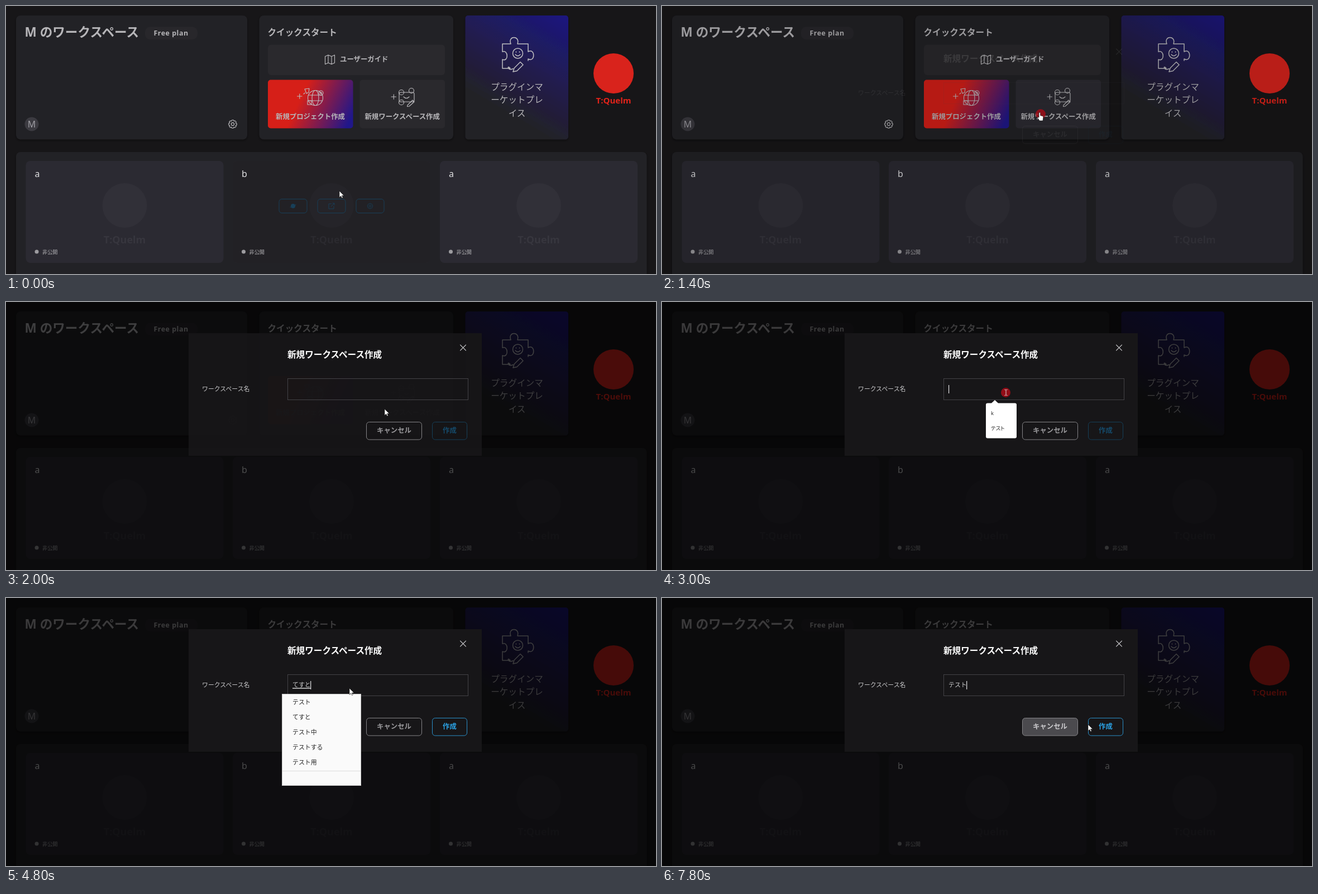
These frames come from a looping animation (1164 by 481 pixels, 8000 ms). An HTML page:

```html
<!DOCTYPE html>
<html lang="ja">
<head>
<meta charset="utf-8">
<title>ワークスペース作成</title>
<style>
html, body { margin: 0; width: 100%; height: 100%; overflow: hidden; background: #171618; }
svg { display: block; width: 100%; height: 100%; }
text { font-family: 'Noto Sans', 'Noto Sans CJK JP', 'Noto Sans CJK', sans-serif; fill: #b7b6b9; }
.b { font-weight: 700; }
.mid { text-anchor: middle; }
.h { font-size: 15.6px; }
.btn { font-size: 12.4px; font-weight: 700; }
.small { font-size: 10.9px; }
.panel { fill: #222125; }
.tile { fill: #2a292d; }
.line { fill: none; stroke: #bfbec1; stroke-width: 1.1; stroke-linejoin: round; stroke-linecap: round; }
.blue { fill: none; stroke: #183f58; }
</style>
</head>
<body>
<svg viewBox="0 0 1164 481" preserveAspectRatio="none">
  <defs>
    <linearGradient id="hot" gradientUnits="userSpaceOnUse" x1="469" y1="140" x2="621" y2="210">
      <stop offset=".38" stop-color="#d61f18"/><stop offset=".96" stop-color="#20178a"/>
    </linearGradient>
    <linearGradient id="cool" gradientUnits="userSpaceOnUse" x1="880" y1="188" x2="988" y2="5">
      <stop offset="0" stop-color="#222125"/><stop offset="1" stop-color="#1e1780"/>
    </linearGradient>
    <filter id="soft" x="-10%" y="-10%" width="120%" height="125%">
      <feDropShadow dx="0" dy="2" stdDeviation="2" flood-color="#000" flood-opacity=".4"/>
    </filter>
    <path id="gear" d="M-1.6 -7.2H1.6L2.3 -5.2L4.3 -6L6.2 -3.8L5.2 -1.8L7.2 -1.2V1.6L5.2 2.2L6.2 4.2L4 6.2L2 5.2L1.4 7.2H-1.6L-2.2 5.2L-4.3 6.2L-6.2 4.2L-5.2 2.2L-7.2 1.6V-1.4L-5.2 -2L-6.2 -4L-4.2 -6L-2.2 -5.2ZM2.6 0A2.6 2.6 0 1 0 -2.6 0A2.6 2.6 0 1 0 2.6 0"/>
  </defs>

  <g filter="url(#soft)">
    <rect class="panel" x="18" y="17" width="414" height="222.500" rx="8"/>
    <rect class="panel" x="453.500" y="17" width="347.500" height="222.500" rx="8"/>
    <rect x="822.500" y="17" width="184.500" height="222.500" rx="5" fill="url(#cool)"/>
    <rect class="panel" x="18" y="262" width="1129.500" height="240" rx="8"/>
  </g>

  <text class="b" x="33.500" y="55" font-size="22.600">M のワークスペース</text>
  <rect x="249" y="37.500" width="94" height="22.500" rx="9" fill="#28272b"/>
  <text class="b mid" x="295.500" y="53" font-size="12.400" letter-spacing=".55">Free plan</text>
  <circle cx="46" cy="212" r="12.500" fill="#3c3b41"/>
  <text class="mid" x="46" y="218" font-size="16" style="fill:#a09fa5">M</text>
  <use href="#gear" class="line" x="406" y="212"/>

  <text class="b h" x="468.500" y="53">クイックスタート</text>
  <rect class="tile" x="469" y="69.500" width="317" height="54.500" rx="6"/>
  <path class="line" d="M571.500 90.500L577 88V102L571.500 104.500ZM577 88L583 90.500V104.500L577 102M583 90.500L588.500 88V102L583 104.500"/>
  <text class="btn" x="598" y="99.500">ユーザーガイド</text>
  <rect x="469" y="132.500" width="152.500" height="87" rx="5" fill="url(#hot)"/>
  <rect id="make" class="tile" x="633.500" y="132.500" width="152.500" height="87" rx="5"/>
  <g class="line">
    <path d="M521.500 162H530M525.800 157.700V166.300M690 163H698.500M694.300 158.700V167.300"/>
    <circle cx="554" cy="165" r="13.500"/>
    <ellipse cx="554" cy="165" rx="6" ry="13.500"/>
    <path d="M541.500 160H566.500M541.500 170H566.500"/>
    <circle cx="564" cy="156" r="4"/><circle cx="564" cy="156" r="1.300"/>
    <rect x="540" y="170" width="7" height="7"/>
    <path d="M535 149L543 148L542 155L538 157Z M535 156L533 158"/>
    <rect x="704" y="155" width="27" height="17" rx="3"/>
    <circle cx="708" cy="155" r="4.500"/><circle cx="726" cy="152" r="4.500"/><circle cx="708" cy="173" r="4.500"/>
    <path d="M712 163Q717 168 722 163M719 178L728 169L731 172L722 180L718.500 180.500Z"/>
  </g>
  <text class="btn mid" x="545" y="202.500">新規プロジェクト作成</text>
  <text class="btn mid" x="709.700" y="202.500">新規ワークスペース作成</text>

  <g class="line" style="stroke-width:1.500">
    <path d="M908 112.500C898 118 897 104 903 112H889V96C900 101 900 78 889 82V68H904C898 52.500 921 52.500 916 68H935V82C948 75 948 102 935 95V98"/>
    <circle cx="916.500" cy="85" r="9"/>
    <path d="M912 87Q916.500 92 921 87M913.500 82V83M919.500 82V83M908 118L910 111.500L921 100.500L926 105.500L915 116.500Z"/>
  </g>
  <g class="mid h">
    <text x="915" y="151">プラグインマ</text>
    <text x="915" y="174">ーケットプレ</text>
    <text x="915" y="197.500">イス</text>
  </g>

  <circle cx="1088" cy="121" r="36" fill="#d9231c"/>
  <text class="b mid" x="1088" y="175" font-size="15" style="fill:#e2231a">T:Quelm</text>

  <g id="cards"></g>
  <rect id="dim" width="1164" height="481" opacity="0"/>

  <g id="modal">
    <rect id="sheet" x="327" y="56" width="525" height="220" fill="#171618"/>
    <g id="form">
      <text class="b h" x="504" y="99.500" style="fill:#fff">新規ワークスペース作成</text>
      <path class="line" stroke-width="1.500" d="M813.500 77L823.500 87M823.500 77L813.500 87"/>
      <text class="small" x="351" y="159.500" style="fill:#c8c8ca">ワークスペース名</text>
      <rect x="504.500" y="137.500" width="323" height="38" fill="none" stroke="#434246"/>
      <rect id="cancel" x="645.500" y="215.500" width="99" height="31.500" rx="5" fill="#4b4a4e" fill-opacity="0" stroke="#858487"/>
      <text id="cancelText" class="btn mid" x="695" y="235">キャンセル</text>
      <rect id="ok" x="763.500" y="215.500" width="62" height="31.500" rx="5" fill="none"/>
      <text id="okText" class="btn mid" x="794.500" y="235">作成</text>
    </g>
    <text id="typed" class="small" x="513" y="159.500" style="fill:#d0d0d2"></text>
    <path id="rule" stroke="#d0d0d2" stroke-width="1.300"/>
    <rect id="caret" y="149" width="1.200" height="15" fill="#e4e4e6"/>
    <g id="saved">
      <path d="M583 181.500H590L596 176L602 181.500H632Q635 181.500 635 184.500V241.500Q635 244.500 632 244.500H583Q580 244.500 580 241.500V184.500Q580 181.500 583 181.500" fill="#fff"/>
      <g font-size="9.500" style="font-feature-settings:'palt'">
        <text x="589" y="203" style="fill:#333">k</text>
        <text x="589" y="230" style="fill:#333">テスト</text>
      </g>
    </g>
    <g id="ime"></g>
  </g>

  <circle id="pulse" fill="#a80c18"/>
  <g id="pointer">
    <path id="arrow" d="M0 0V11.500L2.700 9L4.500 12.700L6.300 11.800L4.500 8.200H8.200Z" fill="#fff" stroke="#111" stroke-width=".6"/>
    <path id="hand" d="M-3 -6Q-1.700 -8.200 -.4 -6V-1.500L3.500 -.6Q5 0 4.800 2L4 8H-2L-5.500 2.500Q-6 .4 -3 2Z" fill="#fff" stroke="#111" stroke-width=".7"/>
    <path id="beam" d="M-2.500 -5H-.8L0 -4.200L.8 -5H2.500M0 -4.200V4.200M-2.500 5H-.8L0 4.200L.8 5H2.500" fill="none" stroke="#d8d8d8"/>
  </g>
</svg>
<script>
const $ = id => document.getElementById(id);
const set = (id, attrs) => { for (const k in attrs) $(id).setAttribute(k, attrs[k]); };
const show = (id, on) => { $(id).style.display = on ? '' : 'none'; };

const LOOP = 8000, STEP = 200;

function card(x, name, hover) {
  const button = (i, icon) => `<g transform="translate(${x + 108 + i * 69} 359)">
    <rect class="blue" x="-25" y="-12.500" width="50" height="25" rx="5"/>${icon}</g>`;
  const tools = hover ? `<g id="tools">
    <rect class="panel" x="${x}" y="278" width="354" height="183" rx="8"/>
    <circle cx="${x + 177}" cy="358" r="40" fill="#252429"/>
    <text class="b mid" x="${x + 177}" y="426" font-size="18" style="fill:#2b2a2f">T:Quelm</text>
    ${button(0, '<circle r="4" fill="#183f58"/><path class="blue" d="M-5.500 2Q3 3 5 -3"/>')}
    ${button(1, '<path class="blue" d="M0 -4H-5V5H4V0M-1 1L5 -5M1.500 -5H5V-1.500"/>')}
    ${button(2, '<use href="#gear" class="blue" stroke-width="1.300" transform="scale(.65)"/>')}
  </g>` : '';
  return `<rect x="${x}" y="278" width="354" height="183" rx="8" fill="#2b2a32"/>
    <circle cx="${x + 177}" cy="358" r="40" fill="#313038"/>
    <text class="b mid" x="${x + 177}" y="426" font-size="18" style="fill:#37363e">T:Quelm</text>
    ${tools}
    <text x="${x + 16}" y="307" font-size="16" style="fill:#e2e2e4">${name}</text>
    <circle cx="${x + 19.5}" cy="441" r="3.500" fill="#9d9ca0"/>
    <text x="${x + 29.5}" y="444.500" font-size="9.200">非公開</text>`;
}
$('cards').innerHTML = card(35.5, 'a') + card(406, 'b', true) + card(777, 'a');

$('ime').innerHTML = '<rect x="494.500" y="172.500" width="141" height="164" fill="#fafafa" stroke="#c8c8c8"/>' +
  ['テスト', 'てすと', 'テスト中', 'テストする', 'テスト用'].map((word, i) =>
    `<text class="small" x="513" y="${191 + i * 27}" style="fill:#222">${word}</text>`).join('') +
  '<path d="M495 310.500H635" stroke="#ddd"/>';

// Linear value of a track of [time, value...] rows, constant outside it
function track(rows, t) {
  let i = 0;
  while (i < rows.length - 1 && rows[i + 1][0] <= t) i++;
  const a = rows[i], b = rows[i + 1] || a;
  const k = b === a ? 0 : Math.max(0, (t - a[0]) / (b[0] - a[0]));
  return a.slice(1).map((v, j) => v + (b[j + 1] - v) * k);
}
// Last value whose time has come
const held = (rows, t) => rows.filter(r => r[0] <= t).pop()[1];

const PATH = [[0, 597, 332], [200, 650, 252], [400, 675, 206], [1200, 677, 206], [1400, 678, 198],
  [1600, 678, 192], [2000, 678, 192], [2400, 656, 178], [2600, 616, 162.5], [4200, 616, 162.5],
  [4400, 615, 162], [6800, 615, 162], [7000, 628, 169], [7200, 661, 192], [7400, 698, 218],
  [7600, 738, 226], [7800, 763, 227]];
const SHAPE = [[0, 'arrow'], [400, 'hand'], [1600, 'arrow'], [2600, 'beam'], [4400, 'arrow']];
const TOOLS = [[0, 1], [200, .95], [400, .85], [600, .5], [800, .25], [1000, .1], [1200, 0]];
const DIM = [[1200, 0], [1400, .15], [1600, .42], [1800, .58], [2000, .66], [2400, .68]];
const SHEET = [[1400, 0], [1600, .45], [1800, .8], [2000, .95], [2200, 1]];
const FORM = [[1200, 0], [1400, .1], [1600, .75], [1800, 1]];
const PULSE = [[0, 8, 0], [1200, 8, 0], [1400, 9, .8], [1600, 15, .18], [1800, 17, 0],
  [2800, 8, 0], [3000, 8.5, .85], [3200, 13, .3], [3400, 15, 0]];
const TYPED = [[0, ''], [4400, 'て'], [4600, 'てす'], [4800, 'てすと'], [5200, 'テスト']];
const HOVER = [[7200, 0], [7400, .8], [7600, 1]];

function draw(t) {
  const [x, y] = track(PATH, t), shape = held(SHAPE, t);
  set('pointer', { transform: `translate(${x} ${y})` });
  for (const s of ['arrow', 'hand', 'beam']) show(s, s === shape);

  const [r, glow] = track(PULSE, t);
  set('pulse', { cx: t < 2600 ? 678 : 615.5, cy: t < 2600 ? 194 : 162.5, r, opacity: glow });

  set('tools', { opacity: track(TOOLS, t)[0] });
  $('make').style.fill = t >= 400 ? '#2d2c32' : '';
  set('dim', { opacity: track(DIM, t)[0] });
  set('sheet', { opacity: track(SHEET, t)[0] });
  set('form', { opacity: track(FORM, t)[0] });

  const text = held(TYPED, t), end = 513 + text.length * 10.9;
  $('typed').textContent = text;
  set('caret', { x: text ? end - .6 : end });
  show('caret', t >= 2800);
  set('rule', { d: `M513 162H${end}` });
  show('rule', text && t < 6600);
  show('saved', t >= 2800 && !text);
  show('ime', t >= 4600 && t < 5600);

  set('ok', { stroke: text ? '#2a8fc8' : '#153f58' });
  $('okText').style.fill = text ? '#2aa0e2' : '#154a6a';
  const [hover] = track(HOVER, t);
  set('cancel', { 'fill-opacity': hover });
  $('cancelText').style.fill = hover ? '#cbcacd' : '#9a999c';
}

function tick(now) {
  const t = now % LOOP;
  draw(t - t % STEP);
  requestAnimationFrame(tick);
}
draw(0);
requestAnimationFrame(tick);
</script>
</body>
</html>
```
